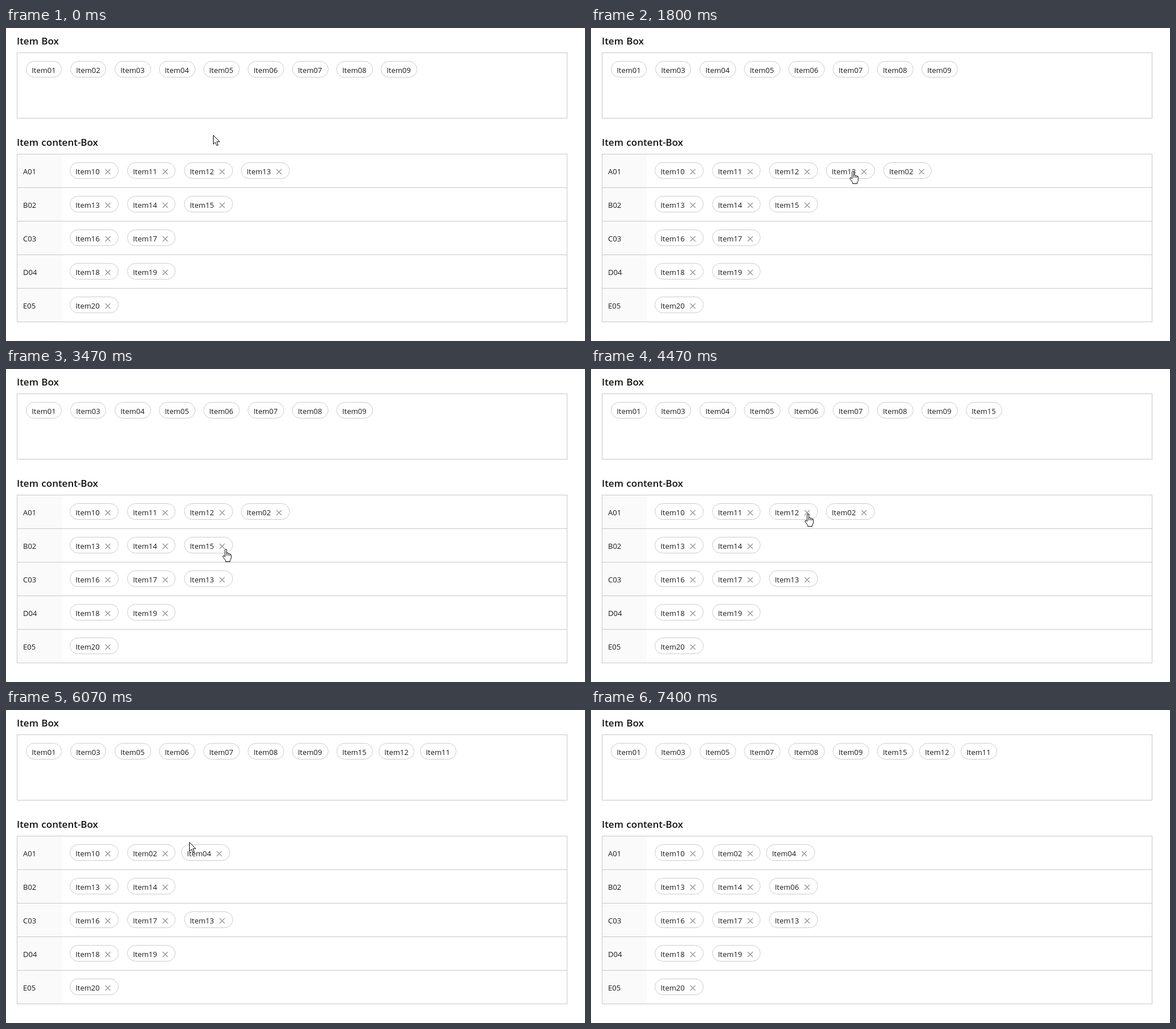
Write an HTML page that moves like this. It is 1018 by 550 pixels and loops after 7870 ms.

```html
<!DOCTYPE html>
<html lang="en">
<head>
<meta charset="utf-8">
<title>Item boxes</title>
<style>
html, body { margin: 0; width: 100%; height: 100%; overflow: hidden; background: #fff; }
svg { display: block; width: 1018px; height: 550px; }
text { font: 13px "Open Sans", "Noto Sans", sans-serif; fill: #1a1a1a; }
.head { font-size: 17px; font-weight: 600; word-spacing: 1px; fill: #111; }
.line { fill: none; stroke: #c8c8c8; }
.pill { fill: #fff; stroke: #ccc; }
.cross { fill: none; stroke: #999; stroke-width: 1.4; }
.cursor { fill: #fff; stroke: #000; stroke-linejoin: round; }
</style>
</head>
<body>
<svg viewBox="0 0 1018 550">
  <text class="head" x="19" y="29">Item Box</text>
  <text class="head" x="19" y="207">Item content-Box</text>
  <rect class="line" x="19.5" y="43.5" width="967" height="115"/>
  <g id="table"></g>
  <g id="pills"></g>
  <g id="pointer"></g>
</svg>
<script>
const LOOP = 7870, STEP = 1000 / 15;
const PILL_H = 29, ROW_H = 59, GAP = 10, SPACE = 4.65;
const SETTLE = 200, RELEASE = 70;
const $ = id => document.getElementById(id);

// Row 0 is the item box, the others are the labelled content rows.
const LABELS = ['A01', 'B02', 'C03', 'D04', 'E05'];
const range = (first, last) => Array.from({ length: last - first + 1 },
  (_, i) => ({ name: String(first + i).padStart(2, '0') }));
const startRows = () =>
  [range(1, 9), range(10, 13), range(13, 15), range(16, 17), range(18, 19), range(20, 20)];

// A drag holds the pill at an offset and carries it to a point; a click hits the cross.
const drag = (name, from, to, grab, drop, hold, end) => ({ name, from, to, grab, drop, hold, end });
const click = (name, from, drop) => ({ name, from, to: 0, grab: drop, drop, hold: [69, 18] });
const MOVES = [
  drag('02', 0, 1, 470, 1200, [42, 16], [559, 257]),
  drag('13', 1, 2, 1800, 2270, [48, 15], [462, 305]),
  drag('13', 2, 3, 2470, 2930, [49, 10], [468, 362]),
  click('15', 2, 4000),
  click('12', 1, 4670),
  click('11', 1, 5000),
  drag('04', 0, 1, 5530, 6070, [32, 25], [322, 232]),
  drag('06', 0, 2, 6400, 6800, [32, 19], [345, 311])
];

function rowsAt(t) {
  const rows = startRows();
  for (const { name, from, to, drop } of MOVES) {
    if (t < drop) break;
    rows[from].splice(rows[from].map(item => item.name).lastIndexOf(name), 1);
    rows[to].push({ name, added: true });
  }
  return rows;
}

// Two neighbours that were both added later have no space between them.
function layout(rows) {
  return rows.flatMap((row, r) => {
    const width = r ? 85.7 : 63.4;
    let left = r ? 112.3 : 35;
    return row.map((item, i) => {
      if (i) left += width + GAP + (item.added && row[i - 1].added ? 0 : SPACE);
      const x = Math.round(left), w = Math.round(left + width) - x;
      return { name: item.name, r, x, y: r ? 177 + ROW_H * r : 58, w };
    });
  });
}

const findPill = (pills, move) => pills.filter(p => p.r === move.from && p.name === move.name).pop();

// The pointer rests before each grab and before each release.
const path = [{ t: 0, x: 364, y: 188 }];
for (const move of MOVES) {
  const pill = findPill(layout(rowsAt(move.drop - 1)), move);
  const at = { x: pill.x + move.hold[0], y: pill.y + move.hold[1] };
  path.push({ t: move.grab - SETTLE, ...at }, { t: move.grab, ...at });
  if (move.end) {
    const [x, y] = move.end;
    path.push({ t: move.drop - RELEASE, x, y }, { t: move.drop, x, y });
  }
}
path.push({ t: 7400, x: 92, y: 560, power: 1 });

function pointerAt(t) {
  const i = path.findIndex(stop => stop.t > t);
  if (i < 0) return null;
  const a = path[i - 1], b = path[i];
  const k = 1 - (1 - (t - a.t) / (b.t - a.t)) ** (b.power || 3);
  return { x: Math.round(a.x + (b.x - a.x) * k), y: Math.round(a.y + (b.y - a.y) * k) };
}

function drawPill({ name, r, x, y, w }) {
  const cross = r ? `<path class="cross" d="M${x + 62.5} ${y + 12}l9 9m0-9l-9 9"/>` : '';
  return `<rect class="pill" x="${x + .5}" y="${y + .5}" width="${w - 1}" height="${PILL_H - 1}" rx="14"/>
    <text x="${x + 10.2}" y="${y + 20.5}">Item${name}</text>${cross}`;
}

const ARROW = '<path d="M.5 .5V16.2L4 12.8L6.5 18.5L9 17.4L6.6 11.8H11.6Z"/>';
const HAND = `<path d="M-2 14V2Q-2 .5 -.5 .5T1 2V7.5Q2.5 6.3 4 8.2Q5.6 7.4 6.6 9.2Q9 8.8 9 11.5V15
  Q9 18 7 20V22.5H-1V20.5L-5.2 14.5Q-6.2 12.6 -5 12T-2 14Z"/><path fill="none" d="M1 7V12M4 8.5V12M6.6 9.5V12"/>`;
const COPY = `<path stroke-dasharray="1 1" fill="none" d="M2.5 15.5H11.5V22.5H2.5Z"/>${ARROW}
  <path d="M9.5 19.5h10v10h-10zM14.5 22v5M12 24.5h5"/>`;

const drawCursor = ({ x, y }, shape) => `<g class="cursor" transform="translate(${x} ${y})">${shape}</g>`;

function drawPointer(t, pills) {
  const tip = pointerAt(t);
  if (!tip) return '';
  const move = MOVES.find(m => t > m.grab && t < m.drop);
  if (move) {
    const ghost = { ...findPill(pills, move), x: tip.x - move.hold[0], y: tip.y - move.hold[1] };
    return `<g opacity=".6">${drawPill(ghost)}</g>` + drawCursor(tip, COPY);
  }
  const hover = pills.some(p => tip.x >= p.x && tip.x < p.x + p.w && tip.y >= p.y && tip.y < p.y + PILL_H);
  return drawCursor(tip, hover ? HAND : ARROW);
}

$('table').innerHTML = '<rect x="20" y="222" width="78" height="295" fill="#fafafa"/>' +
  LABELS.map((label, i) => `<rect class="line" x="19.5" y="${221.5 + ROW_H * i}" width="967" height="${ROW_H}"/>
    <text x="30" y="${256.5 + ROW_H * i}">${label}</text>`).join('');

function render(t) {
  const pills = layout(rowsAt(t));
  $('pills').innerHTML = pills.map(drawPill).join('');
  $('pointer').innerHTML = drawPointer(t, pills);
}

let shown = -1;
const begin = performance.now();
function tick() {
  const t = (performance.now() - begin) % LOOP;
  const step = Math.floor((t + 5) / STEP);
  if (step !== shown) {
    shown = step;
    render(Math.round(step * STEP / 10) * 10);
  }
  requestAnimationFrame(tick);
}
tick();
</script>
</body>
</html>
```
